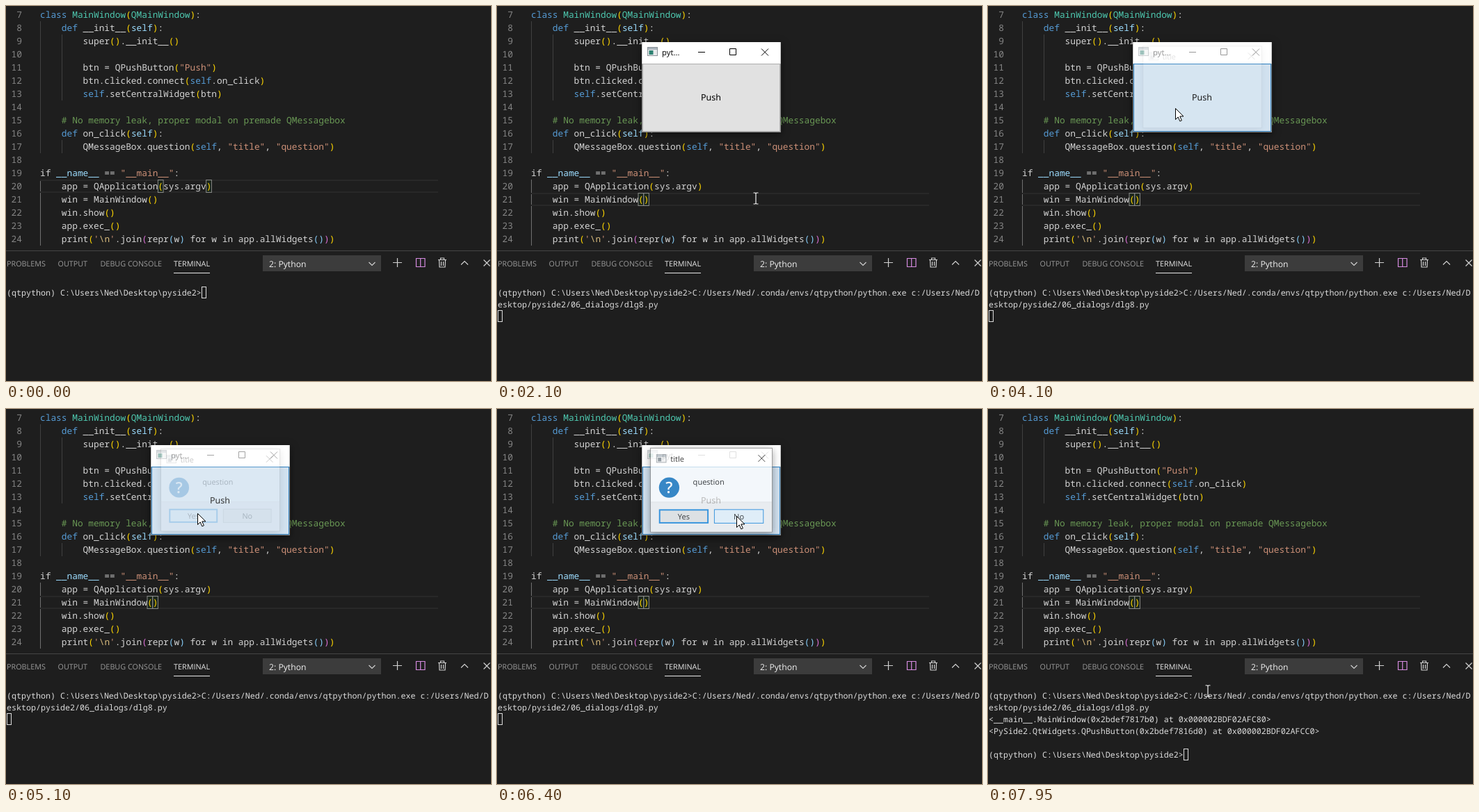
Animation of 697x540 px, one loop 8 s. Source, as an HTML page:

```html
<!DOCTYPE html>
<html lang="en">
<head>
<meta charset="utf-8">
<title>Modal dialog demo</title>
<style>
html, body { margin: 0; width: 100%; height: 100%; overflow: hidden; background: #1e1e1e; }
svg { display: block; width: 100vw; height: 100vh; }
text { white-space: pre; text-rendering: geometricPrecision; font: 11.3px "Open Sans", "Noto Sans", sans-serif; }
.code { font: 12.83px "Noto Sans Mono", monospace; fill: #d4d4d4; }
.term { font: 11.667px "Noto Sans Mono", monospace; fill: #dcdcdc; }
.tab { font-size: 10.8px; fill: #9a9a9a; }
.line { fill: none; stroke: #d0d0d0; stroke-width: 1.2; }
.shadow { filter: drop-shadow(0 3px 6px rgba(0,0,0,.5)); }
</style>
</head>
<body>
<svg viewBox="0 0 697 540">
  <g id="editor"></g>
  <rect id="caret" x="217.5" y="269" width="1.5" height="19" fill="#aeafad"/>

  <g id="panel">
    <path d="M0 352.5H697" stroke="#444"/>
    <text class="tab" x="1" y="375">PROBLEMS</text>
    <text class="tab" x="74.500" y="375">OUTPUT</text>
    <text class="tab" x="135.500" y="375">DEBUG CONSOLE</text>
    <text class="tab" x="241" y="375" style="fill:#e7e7e7">TERMINAL</text>
    <path d="M241 384.5H293" stroke="#e7e7e7"/>
    <rect x="369" y="359" width="170" height="23" fill="#3c3c3c"/>
    <text x="378" y="375.500" style="font-size:12.2px" fill="#f0f0f0">2: Python</text>
    <path class="line" d="M521.500 369l4.500 4.500 4.500-4.500M556 369.500h13M562.500 363v13"/>
    <path class="line" d="M589.500 363.500h12.500v12h-12.500zM595.700 363.500v12" style="stroke:#d58be0"/>
    <path class="line" d="M621 365.500h12M624.500 365v-2h5v2M622.500 366l.5 10h8l.5-10M625.500 368v6M628.500 368v6"/>
    <path class="line" d="M654 372.500l5-5 5 5M686.500 365.500l9 9M695.500 365.500l-9 9"/>
  </g>
  <g id="rows"></g>
  <rect id="block" width="6" height="16" fill="none" stroke="#dcdcdc"/>

  <g id="win" class="shadow">
    <rect x="208" y="52" width="200" height="130" fill="#8c8c8c"/>
    <rect x="208.500" y="52" width="199" height="31" fill="#fff"/>
    <rect id="closeHover" x="362" y="52" width="45.500" height="31" fill="#e81123"/>
    <g id="winTitle">
      <rect x="216.500" y="59.500" width="14" height="12" fill="#e8eaec" stroke="#8a9299"/>
      <rect x="217" y="60" width="13" height="3" fill="#aab4bc"/>
      <rect x="218.500" y="64" width="6" height="6" fill="#2e8272"/>
      <text x="237" y="71">pyt...</text>
      <path d="M289 66.500h10M334.500 61.500h9v9h-9z" fill="none" stroke="#000"/>
      <path id="winX" d="M380 61.500l10 10M390 61.500l-10 10" stroke="#000"/>
    </g>
    <rect id="push" x="209.500" y="83.500" width="197" height="97"/>
    <text x="293" y="136" style="font:12.5px 'Noto Sans',sans-serif">Push</text>
  </g>

  <g id="dlg" class="shadow">
    <rect x="218" y="54.500" width="180" height="124.500" fill="#777"/>
    <rect x="219" y="55.500" width="178" height="122.500" fill="#fff"/>
    <rect x="227.500" y="64.500" width="14" height="11.500" fill="#eceef0" stroke="#8a9299"/>
    <rect x="228" y="65" width="13" height="3" fill="#aab4bc"/>
    <rect x="229.500" y="69" width="5" height="5.500" fill="#6b7780"/>
    <text x="248" y="75">title</text>
    <path d="M377 65l10 10M387 65l-10 10" stroke="#000"/>
    <g id="content">
      <circle cx="246" cy="113" r="15" fill="#0067b8"/>
      <text x="246" y="121" text-anchor="middle" fill="#fff" style="font-size:23px;font-weight:600">?</text>
      <text x="281" y="109">question</text>
      <rect x="219" y="135" width="178" height="43" fill="#f0f0f0"/>
      <path d="M219 134.500h178" stroke="#dfdfdf"/>
      <rect id="yes" x="232" y="146" width="71" height="19" stroke="#0078d7" stroke-width="2"/>
      <rect id="no" x="312.500" y="145.500" width="72" height="20"/>
      <text x="267.500" y="160" text-anchor="middle">Yes</text>
      <text x="348.500" y="160" text-anchor="middle">No</text>
    </g>
  </g>

  <path id="beam" d="M-3.500 -8h2.500l1 1 1-1h2.500M0 -7v14M-3.500 8h2.500l1-1 1 1h2.500" fill="none" stroke="#f0f0f0" stroke-width="1.200"/>
  <path id="arrow" d="M.5 .5v16l3.700-3.600 2.600 6 2.600-1.100-2.600-5.900h5.200z" fill="#fff" stroke="#000"/>
</svg>
<script>
const LOOP = 8000, STEP = 50, CHAR = 7.7, LEFT = 49;
const $ = id => document.getElementById(id);
const esc = s => s.replace(/&/g, "&amp;").replace(/</g, "&lt;").replace(/>/g, "&gt;");
const set = (id, attrs) => { for (const k in attrs) $(id).setAttribute(k, attrs[k]); };
const show = (id, on) => { $(id).style.display = on ? "" : "none"; };
const clamp = v => Math.max(0, Math.min(1, v));

const source = String.raw`class MainWindow(QMainWindow):
    def __init__(self):
        super().__init__()

        btn = QPushButton("Push")
        btn.clicked.connect(self.on_click)
        self.setCentralWidget(btn)

    # No memory leak, proper modal on premade QMessagebox
    def on_click(self):
        QMessageBox.question(self, "title", "question")

if __name__ == "__main__":
    app = QApplication(sys.argv)
    win = MainWindow()
    win.show()
    app.exec_()
    print('\n'.join(repr(w) for w in app.allWidgets()))`.split("\n");

function highlight(line) {
  const brackets = ["#ffd700", "#da70d6", "#87cefa"];
  const isClass = line.startsWith("class"), isDef = /^\s*def/.test(line);
  let depth = 0;
  return line.replace(/#.*|"[^"]*"|'[^']*'|\w+|[()]|[<>&]/g, word => {
    let color;
    if (word[0] === "#") color = "#6a9955";
    else if (/^["']/.test(word)) color = "#ce9178";
    else if (word === "(") color = brackets[depth++ % 3];
    else if (word === ")") color = brackets[--depth % 3];
    else if (/^(class|def)$/.test(word)) color = "#569cd6";
    else if (word === "self") color = isDef ? "#9cdcfe" : "#569cd6";
    else if (isClass) color = "#4ec9b0";
    else if (word === "__name__") color = "#9cdcfe";
    const body = esc(word).replace("\\n", '<tspan fill="#d7ba7d">\\n</tspan>');
    return color ? `<tspan fill="${color}">${body}</tspan>` : body;
  });
}

const guide = (x, y1, y2, color = "#404040") => `<path d="M${x} ${y1}V${y2}" stroke="${color}"/>`;
const rowTop = n => 3 + (n - 7) * 19;
$("editor").innerHTML =
  guide(49.5, 22, 212) + guide(49.5, 250, 345, "#707070") +
  guide(80.5, 41, 136) + guide(80.5, 193, 212) +
  `<path id="current" d="M49 1H621M49 18H621" stroke="#282828" stroke-width="2"/>
   <g id="pair" fill="#006400" fill-opacity=".1" stroke="#888"><rect y=".5" width="7.7" height="18"/><rect y=".5" width="7.7" height="18"/></g>` +
  source.map((line, i) => {
    const y = rowTop(i + 7) + 14;
    return `<text class="code" x="23" y="${y}" text-anchor="end" style="fill:#858585">${i + 7}</text>
      <text class="code" x="${LEFT}" y="${y}">${highlight(line)}</text>`;
  }).join("");

// Terminal rows: [text, row, from, until]
const prompt = "(qtpython) C:\\Users\\Ned\\Desktop\\pyside2>";
const rows = [
  [prompt, 0, 0, 1350],
  [prompt + "C:/Users/Ned/.conda/envs/qtpython/python.exe c:/Users/Ned/D", 0, 1350, LOOP],
  ["esktop/pyside2/06_dialogs/dlg8.py", 1, 1350, LOOP],
  ["<__main__.MainWindow(0x2bdef7817b0) at 0x000002BDF02AFC80>", 2, 7500, LOOP],
  ["<PySide2.QtWidgets.QPushButton(0x2bdef7816d0) at 0x000002BDF02AFCC0>", 3, 7500, LOOP],
  [prompt, 5, 7600, LOOP]
];
$("rows").innerHTML = rows.map(([s, r], i) =>
  `<text class="term" id="row${i}" x="1" y="${417 + r * 17}">${esc(s)}</text>`).join("");

// Terminal cursor: [from, column, row]
const blocks = [[0, 40, 0], [1350, 33, 1], [1400, 0, 2], [7500, 0, 4], [7600, 40, 5]];

// Pointer path: [time, x, y]
const path = [
  [450, 556, 502], [600, 470, 385], [750, 372, 277], [2300, 372, 277], [2600, 305, 192],
  [2850, 269, 147], [4700, 269, 147], [4900, 275, 150], [5850, 275, 150], [6150, 344, 154],
  [6600, 344, 154], [7100, 384, 65], [7250, 384, 65], [7600, 350, 230], [7950, 316, 406]
];
function pointer(t) {
  const i = path.findIndex(p => p[0] > t);
  if (i < 0) return path[path.length - 1].slice(1);
  if (i === 0) return path[0].slice(1);
  const [t0, x0, y0] = path[i - 1], [t1, x1, y1] = path[i];
  const k = (t - t0) / (t1 - t0);
  return [x0 + (x1 - x0) * k, y0 + (y1 - y0) * k];
}

// Dialog visits: [opens, starts closing]
const visits = [[3050, 3550], [4100, 4950], [5600, 6350]];
function fade(t, open, close) {
  if (t < open) return 0;
  return t <= close ? clamp(.1 + (t - open) / 210) : clamp(1 - (t - close) * .0053);
}
function zoom(id, alpha, closing, cx, cy) {
  const s = alpha === 1 ? 1 : .948 + alpha * (closing ? .04 : .05);
  show(id, alpha > 0);
  set(id, { opacity: alpha, transform: `translate(${cx} ${cy}) scale(${s}) translate(${-cx} ${-cy})` });
}

function drawEditor(t) {
  const moved = t >= 750;
  const top = rowTop(moved ? 21 : 20);
  set("current", { transform: `translate(0 ${top})` });
  set("pair", { transform: `translate(0 ${top})` });
  const cols = moved ? [20, 21] : [22, 31];
  [...$("pair").children].forEach((box, i) => box.setAttribute("x", LEFT + cols[i] * CHAR));
  show("caret", (t >= 750 && t < 1100) || (t >= 1350 && t < 1750));
}

function drawTerminal(t) {
  rows.forEach(([, , from, until], i) => show("row" + i, t >= from && t < until));
  const [, col, row] = blocks.filter(b => b[0] <= t).pop();
  set("block", { x: 1.5 + col * 7, y: 405 - .5 + row * 17 });
}

function drawWindows(t, x, y) {
  const visit = visits.find(([o, c]) => t >= o - 50 && t < c + 200);
  const alpha = visit ? fade(t, ...visit) : 0;
  const closing = visit && t > visit[1];
  const winAlpha = t < 1950 ? 0 : t < 7300 ? clamp(.2 + (t - 1950) / 180) : clamp(.75 - (t - 7300) * .0053);
  zoom("win", winAlpha, t > 7250, 308, 117);
  zoom("dlg", alpha, closing, 308, 116);
  show("content", visit && t >= visit[0] + 50);
  set("winTitle", { opacity: alpha > 0 ? .45 : 1 });

  const inWin = x > 208 && x < 408 && y > 52 && y < 182;
  const onClose = inWin && !visit && x > 362 && y < 83;
  show("closeHover", onClose);
  set("winX", { stroke: onClose ? "#fff" : "#000" });

  let look = ["#e1e1e1", "#adadad"];
  if (visit && alpha === 0) look = ["#cce4f7", "#005499"];
  else if (alpha > 0 && alpha < 1) look = ["#d2e2f0", "#2c7fc0"];
  else if (!visit && inWin && y > 83) look = ["#e5f1fb", "#0078d7"];
  set("push", { fill: look[0], stroke: look[1] });

  const onNo = x > 312;
  set("yes", { fill: onNo ? "#e1e1e1" : "#e5f1fb" });
  set("no", { fill: onNo ? "#e5f1fb" : "#e1e1e1", stroke: onNo ? "#0078d7" : "#adadad" });
  return inWin && winAlpha > 0;
}

function draw(t) {
  const [x, y] = pointer(t);
  drawEditor(t);
  drawTerminal(t);
  const arrow = drawWindows(t, x, y);
  const at = { transform: `translate(${Math.round(x)} ${Math.round(y)})` };
  set("arrow", at);
  set("beam", at);
  show("arrow", arrow);
  show("beam", !arrow && t >= 450);
}

const start = performance.now();
function tick() {
  const t = (performance.now() - start) % LOOP;
  draw(Math.floor(t / STEP) * STEP);
  requestAnimationFrame(tick);
}
tick();
</script>
</body>
</html>
```
